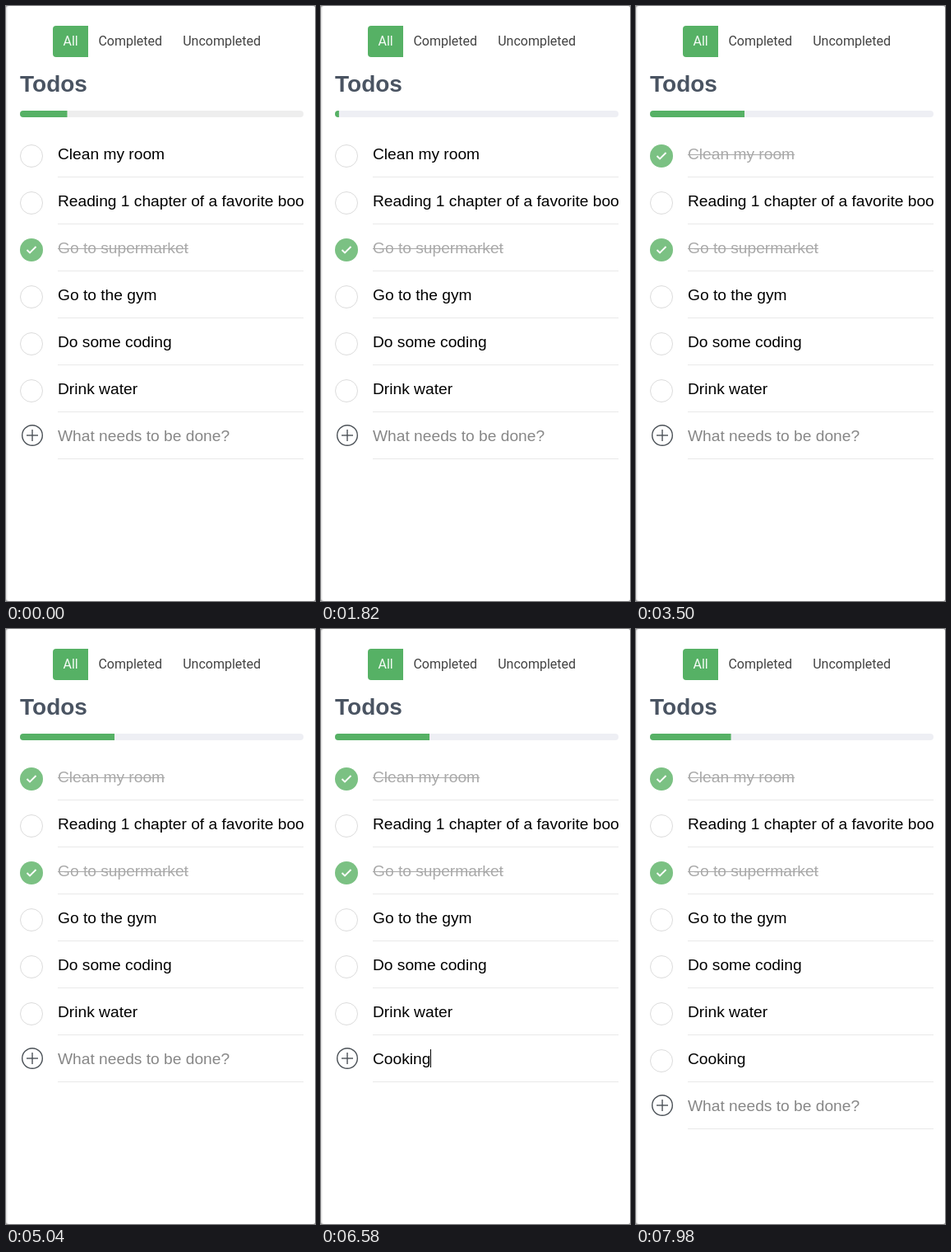
Recreate the animation shown at these times as an HTML page with a canvas. Size 376 by 722 pixels, loop 8 s.

```html
<!DOCTYPE html>
<html lang="en">
<head>
<meta charset="utf-8">
<title>Todos</title>
<style>
  html, body { margin: 0; width: 100%; height: 100%; overflow: hidden; background: #fff; }
  canvas { display: block; width: 376px; height: 722px; }
</style>
</head>
<body>
<canvas id="stage"></canvas>
<script>
const W = 376, H = 722, LOOP = 8000;
const LEFT = 17, RIGHT = 362, TEXT_X = 63, ROW = 57;
const GREEN = '#56b165', SLATE = '#4a5462';
const BODY = '19.2px "Liberation Sans", Arial, sans-serif';
const TABS = '16px Roboto, sans-serif';
const TITLE = 'bold 28px "Liberation Sans", Arial, sans-serif';

const ITEMS = ['Clean my room', 'Reading 1 chapter of a favorite book', 'Go to supermarket',
  'Go to the gym', 'Do some coding', 'Drink water', 'Cooking'];
const NEW_ITEM = ITEMS[6];

// Moments of the story, in ms
const RELOAD = 980, SHELL = 1260, LOADING = 1400, LOADED = 1765, CHECK = 2900,
  FOCUS = 4550, SUBMIT = 6790, ADDED = 7245;
const KEYS = [5810, 5950, 6090, 6230, 6300, 6440, 6580];

const canvas = document.getElementById('stage');
const ctx = canvas.getContext('2d');
const dpr = window.devicePixelRatio || 1;
canvas.width = W * dpr;
canvas.height = H * dpr;

const clamp = v => Math.min(1, Math.max(0, v));
const mix = (a, b, k) => a + (b - a) * k;

// cubic-bezier(.25, .1, .25, 1)
function ease(x) {
  x = clamp(x);
  const curve = (a, b, u) => 3 * a * u * (1 - u) ** 2 + 3 * b * u * u * (1 - u) + u ** 3;
  let lo = 0, hi = 1;
  for (let i = 0; i < 24; i++) {
    const mid = (lo + hi) / 2;
    if (curve(.25, .25, mid) < x) lo = mid; else hi = mid;
  }
  return curve(.1, 1, lo);
}

function progress(t) {
  const go = start => ease((t - start) / 600);
  if (t < RELOAD) return 1 / 6;
  if (t < CHECK) return mix(0, 1 / 6, go(LOADED));
  if (t < ADDED) return mix(1 / 6, 1 / 3, go(CHECK));
  return mix(1 / 3, 2 / 7, go(ADDED));
}

function text(str, x, y, font, color) {
  ctx.font = font;
  ctx.fillStyle = color;
  ctx.fillText(str, x, y);
}

function box(x, y, w, h, radius, color) {
  ctx.fillStyle = color;
  ctx.beginPath();
  ctx.roundRect(x, y, w, h, radius);
  ctx.fill();
}

function circle(x, y, r) {
  ctx.beginPath();
  ctx.arc(x, y, r, 0, Math.PI * 2);
}

function stroke(color, width) {
  ctx.strokeStyle = color;
  ctx.lineWidth = width;
  ctx.stroke();
}

function path(...pts) {
  ctx.beginPath();
  pts.forEach(([x, y]) => ctx.lineTo(x, y));
}

function divider(y) {
  box(TEXT_X, y + 207, RIGHT - TEXT_X, 1, 0, '#e9e9e9');
}

function header(t) {
  box(57, 24, 43, 38, [4, 0, 0, 4], GREEN);
  text('All', 69.5, 48, TABS, '#f4fbf5');
  text('Completed', 112.4, 48, TABS, '#434343');
  text('Uncompleted', 215.2, 48, TABS, '#434343');
  text('Todos', LEFT, 104, TITLE, SLATE);

  ctx.save();
  ctx.beginPath();
  ctx.roundRect(LEFT, 127, RIGHT - LEFT, 8, 4);
  ctx.clip();
  box(LEFT, 127, RIGHT - LEFT, 8, 0, t < RELOAD ? '#eeeeee' : '#eeeff4');
  box(LEFT, 127, (RIGHT - LEFT) * progress(t), 8, 0, GREEN);
  ctx.restore();
}

function item(label, y, done) {
  if (done) {
    circle(31, y + 182, 14);
    ctx.fillStyle = '#7bc183';
    ctx.fill();
    path([25.5, y + 182], [29, y + 185.5], [36.5, y + 178]);
    stroke('#fff', 1.9);
  } else {
    circle(31, y + 182, 13.5);
    stroke('#dcdcdc', 1);
  }
  ctx.save();
  ctx.beginPath();
  ctx.rect(TEXT_X - 1, y + 160, RIGHT - TEXT_X + 1, 40);
  ctx.clip();
  text(label, TEXT_X, y + 186, BODY, done ? '#a9a9a9' : '#000');
  if (done) box(TEXT_X, y + 180, ctx.measureText(label).width, 1, 0, '#a9a9a9');
  ctx.restore();
  divider(y);
}

function spinner(x, y, t) {
  const gap = (t - 7210) / 750 * Math.PI * 2 - Math.PI * .77;
  ctx.beginPath();
  ctx.arc(x, y, 14.5, gap + .72, gap - .72 + Math.PI * 2);
  stroke(SLATE, 3.2);
}

function entry(t, y) {
  circle(32, y + 179, 12.3);
  stroke('#4b5157', 1.4);
  path([25, y + 179], [39, y + 179]);
  stroke('#4b5157', 1.4);
  path([32, y + 172], [32, y + 186]);
  stroke('#4b5157', 1.4);

  const typed = t < ADDED ? NEW_ITEM.slice(0, KEYS.filter(k => t >= k).length) : '';
  const busy = t >= SUBMIT && t < ADDED;
  if (typed) {
    ctx.globalAlpha = busy ? mix(1, .1, clamp((t - SUBMIT) / 150)) : 1;
    text(typed, TEXT_X, y + 186, BODY, '#000');
    ctx.globalAlpha = 1;
  } else {
    text('What needs to be done?', TEXT_X, y + 186, BODY, '#878787');
  }

  const caret = t >= FOCUS && t < SUBMIT && !(t >= 5040 && t < 5600);
  if (caret) {
    ctx.font = BODY;
    const end = ctx.measureText(typed).width;
    box(Math.round(TEXT_X + end), y + 168, 1, 22, 0, '#000');
  }
  if (busy) spinner(213, y + 177.5, t);
  divider(y);
}

function draw(t) {
  ctx.setTransform(dpr, 0, 0, dpr, 0, 0);
  ctx.fillStyle = '#a8a8a8';
  ctx.fillRect(0, 0, W, H);
  box(0, 0, W, H, 3, '#e6e6e6');
  box(1.5, 0, W - 1.5, H, 3, '#fff');

  if (t >= RELOAD && t < SHELL) return;
  header(t);

  if (t >= SHELL && t < LOADED) {
    if (t >= LOADING) spinner(189.5, 190, t);
    entry(t, 80);
    return;
  }
  const count = t < ADDED ? 6 : 7;
  for (let i = 0; i < count; i++) {
    item(ITEMS[i], i * ROW, i === 2 || (i === 0 && t >= CHECK));
  }
  entry(t, count * ROW);
}

const start = performance.now();
function tick() {
  draw((performance.now() - start) % LOOP);
  requestAnimationFrame(tick);
}
tick();
</script>
</body>
</html>
```
